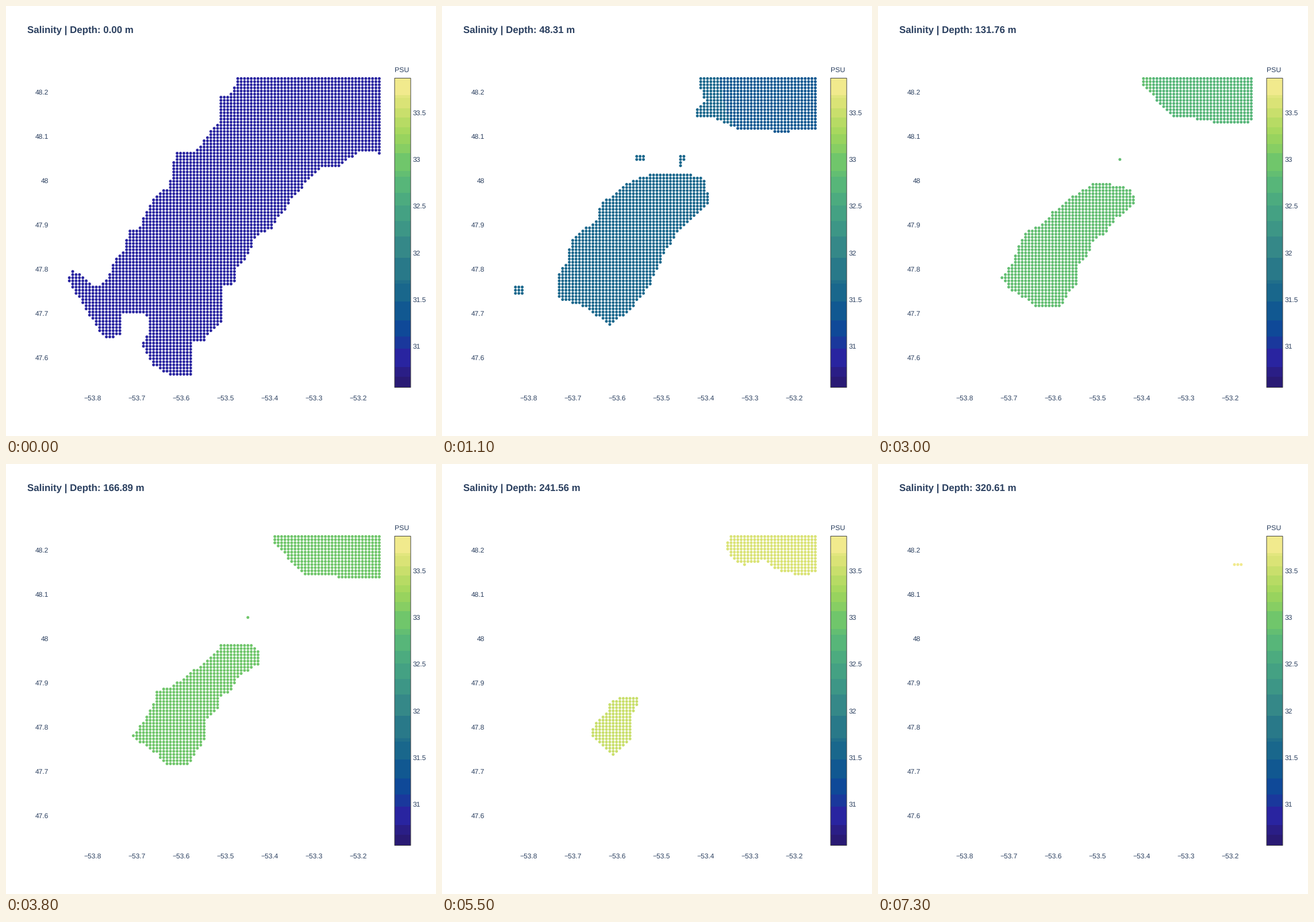
Write a matplotlib script that moves like this. It is 748 by 748 pixels and loops after 7400 ms.

```python
from itertools import product

import matplotlib.pyplot as plt
import numpy as np
from matplotlib.animation import FuncAnimation
from matplotlib.colors import LinearSegmentedColormap
from matplotlib.patches import Rectangle
from matplotlib.path import Path

plt.rcParams["font.family"] = "Liberation Sans"
plt.rcParams["text.hinting"] = "none"

SIZE, FRAMES, STEP_MS = 748, 74, 100
MAX_DEPTH = 320.61
INK = "#2a3f5f"
REACH = 7  # cells over which a coastline can move between two key depths

X, Y = np.meshgrid(110.2 + 5.86 * np.arange(93), 126.2 + 5.4138 * np.arange(97))
CELLS = np.column_stack([X.ravel(), Y.ravel()])

# Colour scale: painted in steps, 162.6 px per PSU
HALINE = LinearSegmentedColormap.from_list("haline", [np.array(c) / 255 for c in (
    (41, 24, 107), (42, 35, 160), (15, 71, 153), (18, 95, 142), (38, 116, 137),
    (53, 136, 136), (65, 157, 133), (81, 178, 124), (111, 198, 107),
    (160, 214, 91), (212, 225, 112), (253, 238, 153))])
BAR_TOP, BAR_END = 125.5, 663.5
EDGES = np.array([BAR_TOP, 155, 160, 178, 194, 211, 223, 240, 256, 287, 297, 325,
                  347, 374, 401, 438, 477, 483, 514, 547, 575, 596, 628, 645, BAR_END])
BANDS = HALINE((BAR_END - (EDGES[1:] + EDGES[:-1]) / 2) / (BAR_END - BAR_TOP))


def psu_to_y(psu):
    return 592 - (psu - 31) * 162.6


# ---- water outlines at the key depths ----

def outline(*points):
    return Path(points).contains_points(CELLS).reshape(X.shape)


def block(x, y, half_w=5, half_h=5):
    return (abs(X - x) < half_w) & (abs(Y - y) < half_h)


def union(*parts):
    return np.any(parts, axis=0)


def surface():
    return outline(
        (400, 122), (652, 122), (652, 265), (646, 254), (618, 253), (575, 281),
        (547, 281), (493, 340), (488, 357), (470, 368), (465, 388), (436, 398),
        (418, 440), (401, 458), (401, 481), (378, 488), (378, 546), (342, 584),
        (324, 584), (324, 643), (305, 644), (272, 638), (254, 622), (236, 587),
        (248, 565), (248, 543), (236, 535), (201, 535), (201, 573), (171, 579),
        (125, 505), (107, 478), (116, 458), (160, 490), (173, 478), (195, 432),
        (207, 424), (212, 388), (230, 388), (255, 335), (284, 314), (295, 254),
        (329, 254), (371, 199), (371, 156), (395, 152))


def shallow():
    north = outline(
        (435, 123), (652, 123), (652, 221), (590, 232), (510, 232), (488, 221),
        (435, 221), (435, 212), (452, 202), (435, 185), (435, 160), (442, 150))
    basin = outline(
        (322, 294), (355, 280), (430, 275), (477, 282), (477, 345), (408, 407),
        (424, 417), (402, 434), (392, 468), (354, 518), (324, 543), (324, 578),
        (292, 601), (254, 582), (259, 541), (248, 530), (195, 530), (160, 502),
        (160, 491), (188, 491), (190, 465), (206, 445), (213, 405), (230, 390),
        (258, 372), (254, 341), (276, 329))
    knoll = outline((494, 286), (518, 305), (507, 324), (488, 324), (488, 312))
    upper = [block(x, 240, w, 8) for x, w in
             ((345, 9), (421, 9), (459, 18), (495, 7), (521, 9), (547, 5))]
    lower = [block(x, 265, w, 11) for x, w in
             ((350, 20), (395, 5), (415, 9), (445, 9), (471, 5))]
    return union(north, basin, knoll, *upper, *lower, block(421, 202, 3, 19),
                 block(134, 492, 14, 15), block(365, 524))


def middle():
    north = outline(
        (453, 123), (652, 123), (652, 205), (640, 210), (594, 210), (550, 201),
        (517, 199), (480, 166), (453, 134))
    basin = outline(
        (372, 302), (400, 302), (440, 315), (453, 332), (453, 350), (440, 354),
        (400, 398), (378, 412), (372, 432), (354, 448), (354, 480), (324, 518),
        (324, 530), (272, 530), (228, 502), (208, 480), (207, 472), (230, 440),
        (230, 416), (252, 392), (284, 372), (289, 350), (336, 314))
    islets = [block(*p) for p in ((447, 188), (345, 265), (418, 265), (136.5, 497))]
    return union(north, basin, *islets)


def lower():
    north = outline((465, 123), (652, 123), (652, 199), (577, 199), (574, 194),
                    (518, 194), (463, 134))
    basin = outline(
        (376, 313), (430, 313), (442, 330), (442, 346), (400, 372), (395, 392),
        (374, 406), (371, 426), (348, 444), (348, 474), (318, 525), (282, 525),
        (260, 502), (217, 474), (238, 450), (258, 412), (262, 396), (292, 384),
        (348, 344))
    return union(north, basin, block(421, 267, 3, 3))


def deep():
    north = outline((471, 123), (652, 123), (652, 194), (634, 199), (617, 199),
                    (563, 183), (530, 183), (525, 189), (517, 189), (471, 130))
    basin = outline(
        (412, 313), (424, 313), (430, 327), (406, 356), (389, 364), (389, 382),
        (372, 400), (371, 420), (337, 447), (342, 466), (306, 518), (292, 525),
        (242, 476), (242, 460), (277, 424), (278, 408), (340, 368), (388, 324))
    return union(north, basin)


def trench():
    north = outline((635, 129), (652, 129), (652, 189), (618, 194), (576, 178),
                    (576, 156), (598, 139))
    ledge = outline((505, 145), (530, 145), (541, 152), (541, 167), (525, 167),
                    (523, 161), (505, 161))
    basin = outline((301, 421), (318, 421), (312, 441), (324, 450), (324, 475),
                    (304, 498), (277, 475), (277, 455), (298, 437))
    return union(north, ledge, basin)


def bottom():
    return block(626, 175, 8, 3)


def shore_distance(water):
    """Distance in cells to the nearest shore, negative on land."""
    h, w = water.shape
    wide = np.pad(water, REACH, mode="edge")
    dist = np.full(water.shape, float(REACH))
    for i, j in product(range(2 * REACH + 1), repeat=2):
        other = wide[i:i + h, j:j + w] != water
        dist[other] = np.minimum(dist[other], np.hypot(i - REACH, j - REACH))
    return np.where(water, dist, -dist)


LEVELS = [0, 5, 22, 38, 49, 61, 73]
SHORES = [shore_distance(level()) for level in
          (surface, shallow, middle, lower, deep, trench, bottom)]


def water_at(n):
    k = min(np.searchsorted(LEVELS, n, side="right") - 1, len(LEVELS) - 2)
    u = (n - LEVELS[k]) / (LEVELS[k + 1] - LEVELS[k])
    if k == 1:  # the shallow sills drown early
        u = 1 - (1 - u) ** 1.7
    return SHORES[k] * (1 - u) + SHORES[k + 1] * u > 0


# ---- salinity ----

rng = np.random.default_rng(4)
GRAIN = rng.normal(0, 0.02, (1, 93)) + rng.normal(0, 0.02, (97, 1))


def bump(x, y, w, h):
    return np.exp(-((X - x) / w) ** 2 - ((Y - y) / h) ** 2)


def pulse(n, mid, width):
    return np.exp(-((n - mid) / width) ** 2)


NORTH = (X > 430) & (Y < 250)
EAST = 1 / (1 + np.exp((488 - X + (Y - 150) * 0.3) / 5))
PLUME = (0.27 * bump(335, 335, 60, 55) + 0.18 * bump(475, 318, 40, 35)
         + 0.17 * bump(479, 165, 4, 50) + GRAIN)
FRONT = 0.5 + 0.5 * np.tanh((X - Y + 68) / 14)


def salinity(n):
    base = np.interp(n, LEVELS, [30.88, 30.87, 32.71, 32.97, 33.23, 33.74, 33.84])
    north = np.interp(n, LEVELS, [0, 0, -0.27, 0, 0.13, 0, 0])
    s = base + north * NORTH * (EAST if n < 38 else 1)
    s = s + PLUME * pulse(n, 5.5, 4)
    return s + 0.23 * FRONT * ~NORTH * pulse(n, 49, 6)


def dot_colors(psu):
    band = np.searchsorted(EDGES, psu_to_y(psu), side="right") - 1
    return BANDS[np.clip(band, 0, len(BANDS) - 1)]


# ---- stage ----

fig = plt.figure(figsize=(SIZE / 100, SIZE / 100), dpi=100, facecolor="white")
ax = fig.add_axes([0, 0, 1, 1])
ax.set_xlim(0, SIZE)
ax.set_ylim(SIZE, 0)
ax.axis("off")


def label(x, y, text, px=12, **kw):
    return ax.text(x, y, text, fontsize=px * 0.72, color=INK, va="baseline", **kw)


for i in range(7):
    label(151 + 76.9 * i, 685.5, f"\u221253.{8 - i}", ha="center")
    label(74, 154.2 + 76.9 * i, f"{48.2 - 0.1 * i:.1f}".replace("48.0", "48"), ha="right")
for psu in np.arange(31, 34, 0.5):
    label(707.3, psu_to_y(psu) + 4.2, f"{psu:g}")
label(675.6, 115.2, "PSU", 12.3)

for top, end, color in zip(EDGES[:-1], EDGES[1:], BANDS):
    ax.add_patch(Rectangle((676, top), 28, end - top, fc=color, ec="none", aa=False))
ax.add_patch(Rectangle((676, BAR_TOP), 28, BAR_END - BAR_TOP, fill=False,
                       ec="#444444", lw=0.72, snap=False))

title = label(37.4, 47, "", 16.9, weight="bold")
dots = ax.scatter([], [], s=3.6 ** 2, linewidths=0)


def draw(n):
    water = water_at(n)
    dots.set_offsets(np.column_stack([X[water], Y[water]]))
    dots.set_facecolors(dot_colors(salinity(n)[water]))
    title.set_text(f"Salinity | Depth: {MAX_DEPTH * n / (FRAMES - 1):.2f} m")
    return dots, title


anim = FuncAnimation(fig, draw, frames=FRAMES, interval=STEP_MS, repeat=True,
                     repeat_delay=0, blit=False)
plt.show()
```
